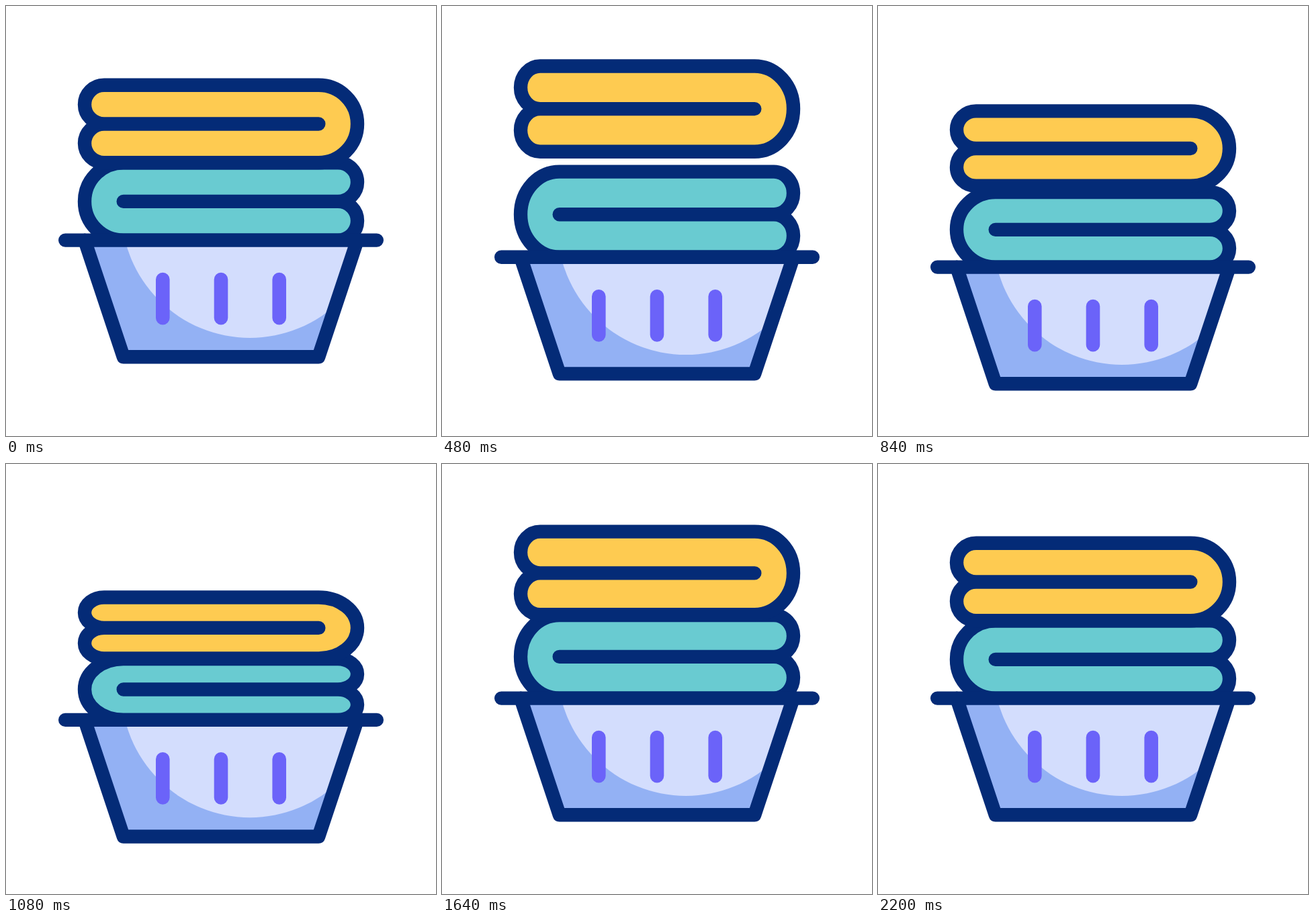
Animation, 640 px wide and 640 px high, one loop 2280 ms. Source, as an HTML page:

```html
<!DOCTYPE html>
<html lang="en">
<head>
<meta charset="utf-8">
<title>Laundry basket</title>
<style>
html, body { margin: 0; width: 100%; height: 100%; overflow: hidden; background: #fff; }
svg { display: block; width: 100%; height: 100%; }
.line { stroke: #042b77; stroke-width: 20.4; stroke-linecap: round; stroke-linejoin: round; }
</style>
</head>
<body>
<svg viewBox="0 0 640 640">
  <clipPath id="inside"><path d="M117 348.6H523L465.2 522.2H174.8Z"/></clipPath>
  <path id="teal" class="line" fill="#69cbd1"/>
  <path id="yellow" class="line" fill="#fecb51"/>
  <g id="basket">
    <g clip-path="url(#inside)">
      <rect x="100" y="340" width="440" height="190" fill="#93b1f4"/>
      <circle cx="363" cy="302.4" r="191.5" fill="#d3ddfd"/>
    </g>
    <path d="M233.3 407V464.2M320 407V464.2M406.7 407V464.2" stroke="#6b63f9" stroke-width="20.6" stroke-linecap="round"/>
    <path class="line" fill="none" d="M117 348.6L174.8 522.2H465.2L523 348.6M88.2 348.6H551.8"/>
  </g>
</svg>
<script>
const LOOP = 2280, STEP = 40, RIM = 348.6;
const BIG = 57.7, SMALL = 29; // horizontal radii of the folds

// Each track is a list of [time, value], eased between neighbours.
const drop = [[110, 0], [740, 40], [900, 40], [1540, 0]];
const half = [[100, 57.7], [540, 63.9], [580, 63.9], [1165, 44.3], [1700, 62.4], [2200, 57.7]];
const toss = [[100, 233.2], [400, 213.8], [1080, 289.4]];
const gap = [[1080, 0.7], [1700, 0.9], [2200, 0]];

const $ = id => document.getElementById(id);

function at(track, t) {
  const i = track.findIndex(k => k[0] > t);
  if (i === 0) return track[0][1];
  if (i < 0) return track[track.length - 1][1];
  const [t0, a] = track[i - 1], [t1, b] = track[i];
  const u = (t - t0) / (t1 - t0);
  return a + (b - a) * u * u * (3 - 2 * u);
}

// A folded towel: one big round end, two small lobes at the other end.
function towel(bigX, lobeX, sweep, bottom, h) {
  const mid = bottom - h, top = mid - h;
  const lobe = y => `A${SMALL} ${h / 2} 0 0 ${sweep} ${lobeX} ${y}`;
  return `M${lobeX} ${top}H${bigX}A${BIG} ${h} 0 0 ${sweep} ${bigX} ${bottom}` +
    `H${lobeX}${lobe(mid)}${lobe(top)}ZM${lobeX} ${mid}H${bigX}`;
}

function draw(now) {
  const t = Math.floor(now % LOOP / STEP) * STEP;
  const dy = at(drop, t), h = at(half, t);
  const tealBottom = RIM + dy;
  const yellowBottom = t < 1080 ? at(toss, t) : tealBottom - 2 * h - at(gap, t);
  $('basket').setAttribute('transform', `translate(0 ${dy})`);
  $('teal').setAttribute('d', towel(174.7, 494, 0, tealBottom, h));
  $('yellow').setAttribute('d', towel(465.3, 146, 1, yellowBottom, h));
}

const start = performance.now();
function tick() {
  draw(performance.now() - start);
  requestAnimationFrame(tick);
}
tick();
</script>
</body>
</html>
```
